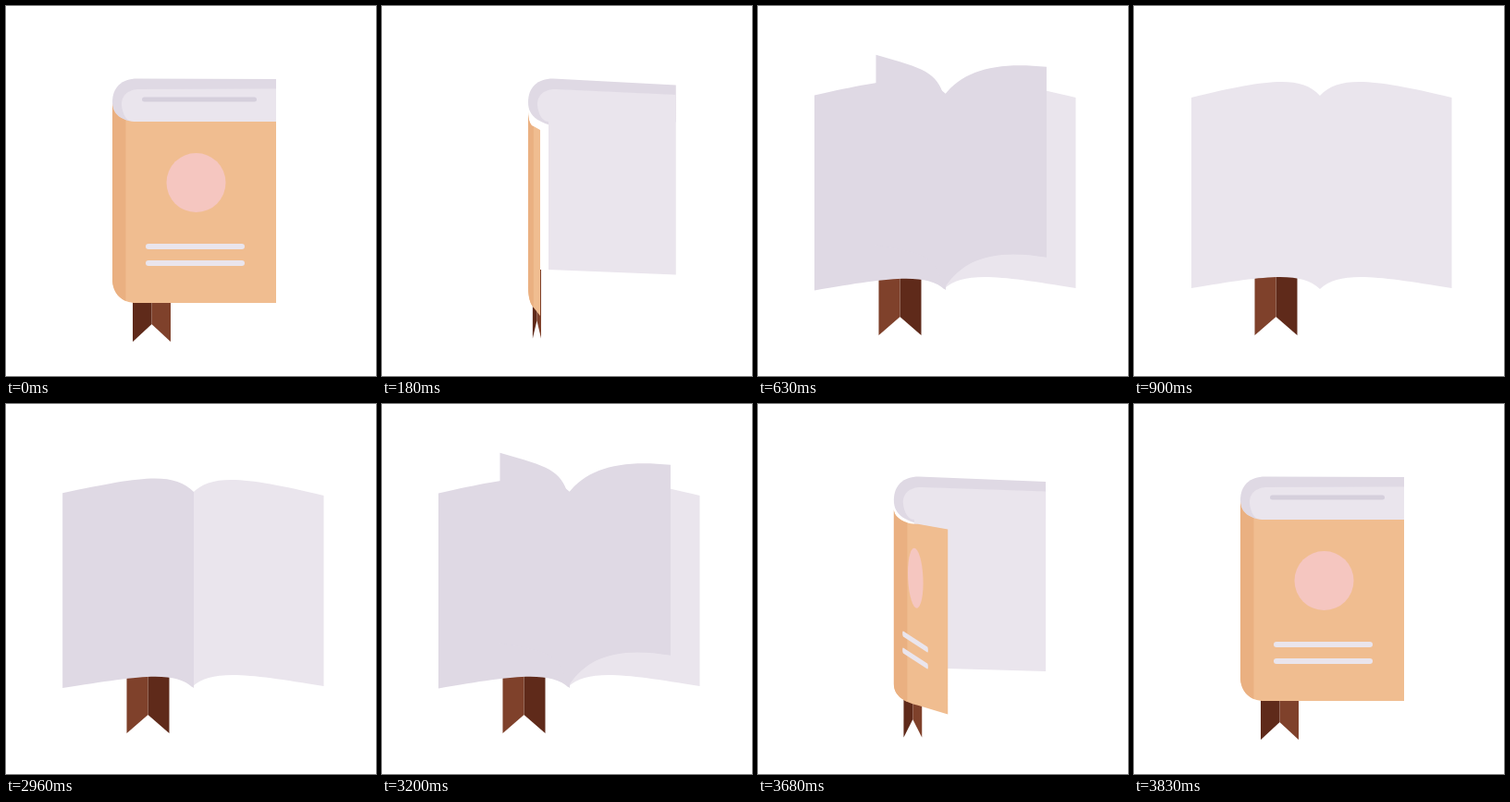
Write an HTML page with a canvas that moves like this. It is 400 px wide and 400 px high and loops after 4860 ms.

```html
<!DOCTYPE html>
<html lang="en">
<head>
<meta charset="utf-8">
<title>Book</title>
<style>
  html, body { margin: 0; width: 100%; height: 100%; overflow: hidden; background: #fff; }
  canvas { display: block; width: 100%; height: 100%; }
</style>
</head>
<body>
<canvas id="stage" width="400" height="400"></canvas>
<script>
const ctx = document.getElementById('stage').getContext('2d');
const LOOP = 4860, STEP = 30, STEPS = 30, CLOSE_AT = 2930;
const COVER_STEPS = 12, FLIP_STEPS = 13, FLIP_STARTS = [4.4, 8.6, 13, 17];
const COLORS = {
  page: '#eae5ed', shade: '#dfd9e4', bar: '#d5cfdc',
  cover: '#f0bd90', spine: '#eab081', badge: '#f5c6c0',
  ribbonDark: '#5f2a1a', ribbonLight: '#7f412b'
};

const clamp = (v, lo, hi) => Math.min(hi, Math.max(lo, v));
const lerp = (a, b, f) => a + (b - a) * f;
const ease = f => (1 - Math.cos(Math.PI * f)) / 2;

function fill(path, color) {
  ctx.fillStyle = color;
  ctx.fill(new Path2D(path));
}

function bar(x1, x2, y, width, color) {
  ctx.strokeStyle = color;
  ctx.lineWidth = width;
  ctx.lineCap = 'round';
  ctx.beginPath();
  ctx.moveTo(x1 + width / 2, y);
  ctx.lineTo(x2 - width / 2, y);
  ctx.stroke();
}

// One curved leaf, from the fold at x to its free edge at x + reach.
// angle: 0 lies on the right, PI on the left.
function leaf(x, reach, edgeY, angle, color, grow = 0) {
  const s = Math.sin(angle), c = Math.cos(angle);
  const height = 206 + 5 * grow, foldY = 97 - 2 * grow;
  const x1 = x + reach * (.15 + .09 * s * c);
  const x2 = x + reach * (.43 + s * (.25 * c - .05));
  const y1 = foldY - 23 - 5 * s * (1 + c);
  const y2 = edgeY - 19 + s * (32.5 - 14 * c);
  const drop = 212 - 15 * s + 4 * grow, end = x + reach;
  const fold = x + 2 * grow;
  fill(`M${fold},${foldY}C${x1},${y1} ${x2},${y2} ${end},${edgeY}
    V${edgeY + height}C${x2},${y2 + drop} ${x1},${y1 + drop} ${fold},${foldY + 209 + 3 * grow}Z`, color);
}

function flippingLeaf(book, progress) {
  const angle = Math.PI * ease(progress);
  const s = Math.sin(angle), c = Math.cos(angle);
  const grow = c < 0 ? c ** 8 : 0;
  const reach = c > 0 ? (book.right - book.spine) * c : 139 * c - grow;
  const rise = 62 * s ** 1.5 + 5 * s * c;
  leaf(book.spine, reach, 99 - rise - 2.5 * grow, angle, COLORS.shade, grow);
}

function ribbon(book) {
  const turn = book.cos + .21 * book.sin;
  const mid = book.spine + lerp(42.5, 47.5, book.open) * turn;
  const half = lerp(20.5, 23, book.open) * turn;
  const tip = lerp(363, 356, book.open), notch = lerp(344, 336, book.open);
  const side = (x, color) => fill(`M${mid},285H${x}V${tip}L${mid},${notch}Z`, color);
  side(mid - half, COLORS.ribbonDark);
  side(mid + half, COLORS.ribbonLight);
}

function backHalf(book) {
  const { spine: x, right, backTop: top } = book;
  fill(`M${x},104C${x},88 ${x + 10},78.5 ${x + 27},78.5L${right},${top}V${top + 40}
    L${x + 40},132C${x + 12},128 ${x},120 ${x},104Z`, COLORS.shade);
  fill(`M${right},${top + 10.5}L${x + 30},90C${x + 15},90 ${x + 10},98 ${x + 10},107
    C${x + 11},118 ${x + 16},125 ${x + 22},125V285L${right},${top + 205}Z`, COLORS.page);
}

function frontCover(book) {
  const { spine: x, sin: s, cos: c, edgeTop, edgeBottom } = book;
  const edge = x + 177 * c + 13 * s;
  const bend = Math.min(26, (edge - x) * .45);
  const outline = new Path2D(`M${x},${105 + 9 * s}
    C${x},${118 + 5 * s} ${x + bend * .45},${125 + 5 * s} ${x + bend},${125 + 5 * s}
    L${edge},${edgeTop}V${edgeBottom}L${x + bend},${321 + 5 * s}
    C${x + bend * .4},${321 + s} ${x},${311 + 4 * s} ${x},${295 + 8 * s}Z`);
  ctx.save();
  ctx.fillStyle = COLORS.cover;
  ctx.fill(outline);
  ctx.clip(outline);
  ctx.fillStyle = COLORS.spine;
  ctx.fillRect(x - 1, 90, Math.min(14.5, bend) + 1, 260);

  const shear = .67 * s * c;
  ctx.transform(c, shear, 0, 1, x - 115 * c, -3 * s - shear * 205);
  ctx.fillStyle = COLORS.badge;
  ctx.beginPath();
  ctx.arc(205.5, 191, 32, 0, 2 * Math.PI);
  ctx.fill();
  for (const y of [260, 278]) bar(151, 258, y, 6, COLORS.page);
  ctx.restore();
}

function draw(step) {
  const turned = Math.min(1, step / COVER_STEPS);
  const angle = Math.PI * turned, open = ease(turned);
  const sin = Math.sin(angle), cos = Math.cos(angle);
  const book = {
    open, sin, cos,
    spine: lerp(115, 201, open),
    right: lerp(292, 343.5, open),
    backTop: 79 + 20 * turned ** 1.6,
    edgeTop: lerp(125, 99, turned) + 22 * sin,
    edgeBottom: lerp(321, 305, turned) + 22 * sin
  };

  ctx.clearRect(0, 0, 400, 400);
  ribbon(book);
  if (turned <= .5) {
    backHalf(book);
    if (step < 2) bar(147, 271, 101, 5, COLORS.bar);
    frontCover(book);
    return;
  }
  leaf(book.spine, book.right - book.spine, book.backTop, 0, COLORS.page);
  leaf(book.spine, 139 * cos, book.edgeTop, Math.PI, COLORS.page);
  for (const start of FLIP_STARTS) {
    const progress = (step - start) / FLIP_STEPS;
    if (progress > 0 && progress < 1) flippingLeaf(book, progress);
  }
}

function frame() {
  const t = performance.now() % LOOP;
  const stepsSince = from => clamp(Math.floor((t - from) / STEP), 0, STEPS);
  draw(stepsSince(0) - stepsSince(CLOSE_AT));
  requestAnimationFrame(frame);
}
frame();
</script>
</body>
</html>
```
